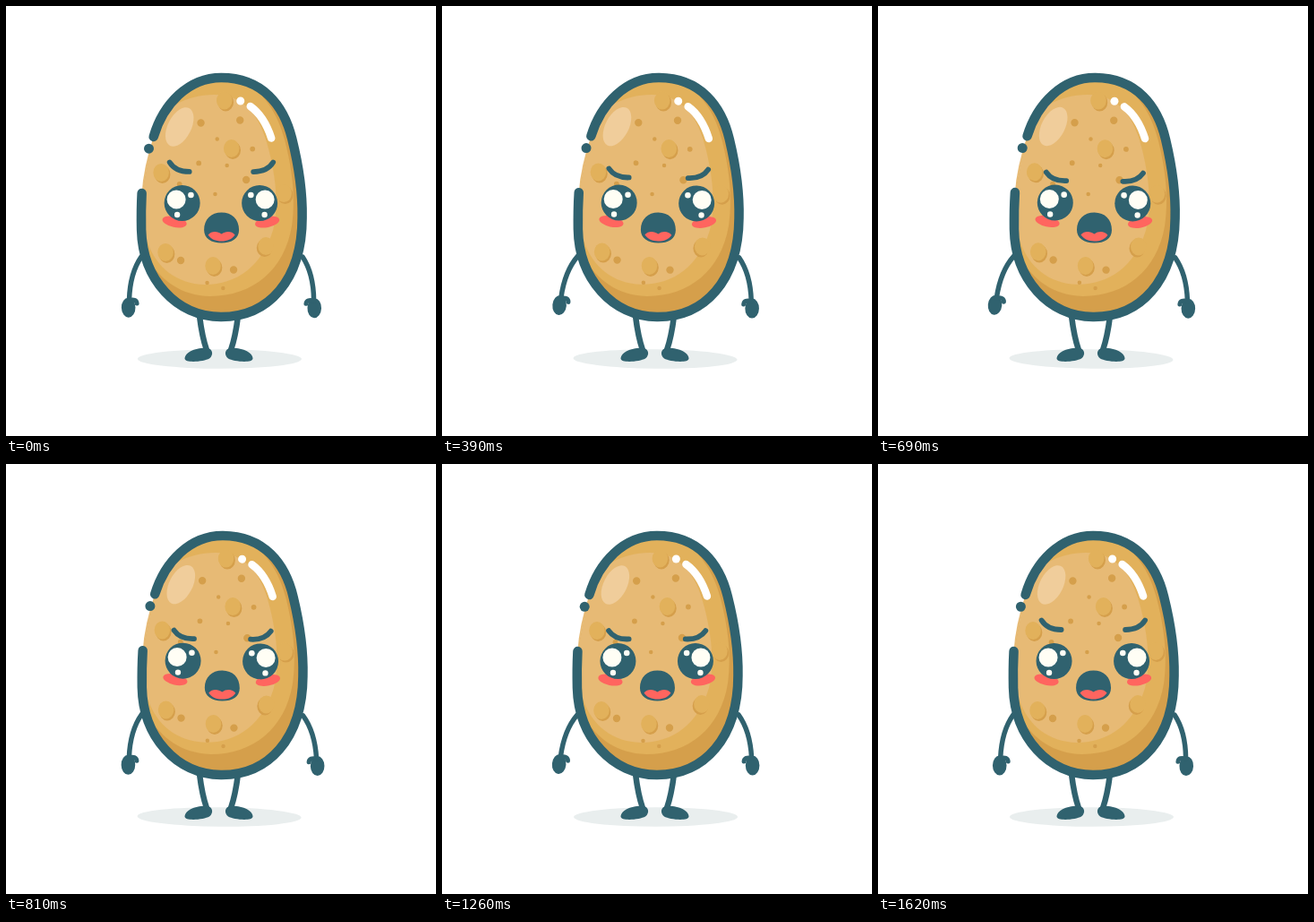
An HTML page for the animation above (1.65 s loop, 480x480 px).

```html
<!DOCTYPE html>
<html lang="en">
<head>
<meta charset="utf-8">
<title>Angry potato</title>
<style>
  html, body { margin: 0; width: 100%; height: 100%; overflow: hidden; background: #fff; }
  svg { display: block; width: 100vw; height: 100vh; }
  .line, .dots { fill: none; stroke: #30626f; stroke-linecap: round; }
  .dots { stroke: #d59f4b; }
  .ink { fill: #30626f; }
  .red { fill: #ff655f; }
  .white { fill: #fffef5; }
  .light { fill: #e7ba75; }
  .mid { fill: #e2b15b; }
  .dark { fill: #d59f4b; }
</style>
</head>
<body>
<svg viewBox="0 0 480 480">
  <defs>
    <path id="skin" d="M164.500 146C175 110 203 80 240 80C286 80 310 111 319 148C326.500 178 331 205 330.500 236C330.500 306 293 347 240 347C190 347 152.500 305 151 250Q150.500 228 151.500 209"/>
    <clipPath id="inside"><use href="#skin"/></clipPath>
    <g id="leg">
      <path class="line" stroke-width="6.500" d="M216 346Q219 370 224 384"/>
      <path class="ink" d="M199.500 393.500C200 385.500 213 381.500 224 381.500C231 382.500 232 389.500 227 393.500C221 397 199.500 399 199.500 393.500Z"/>
    </g>
    <g id="arm">
      <path class="line" stroke-width="5.500" d="M151 280Q138 298 136.500 328"/>
      <ellipse class="ink" cx="135.500" cy="336.500" rx="7.800" ry="11"/>
      <path class="line" stroke-width="5" d="M136 328.500Q144.500 326.500 145 332"/>
    </g>
    <g id="bump">
      <ellipse class="dark" cx="1.500" cy="2" rx="8.800" ry="10"/>
      <ellipse class="mid" rx="8.800" ry="10"/>
    </g>
    <g id="eye">
      <circle class="ink" cx="196.500" cy="220" r="20"/>
      <circle class="white" cx="206.300" cy="211" r="3.300"/>
      <circle class="white" cx="191" cy="233" r="3.200"/>
    </g>
    <ellipse id="blush" class="red" cx="188" cy="241" rx="13.800" ry="6" transform="rotate(12 188 241)"/>
    <path id="brow" class="line" stroke-width="5.800" d="M182.500 174.500Q189 185 204.500 185"/>
  </defs>

  <g class="sway">
    <ellipse cx="238.500" cy="394" rx="91.500" ry="10.800" fill="#e9eeee"/>
  </g>
  <use href="#leg"/>
  <use href="#leg" transform="translate(475) scale(-1 1)"/>

  <g class="sway">
    <use href="#arm" id="armL"/>
    <g transform="translate(482) scale(-1 1)"><use href="#arm" id="armR"/></g>

    <path class="light" d="M151.500 209Q153 181 164.500 146Z"/>
    <use href="#skin" class="dark"/>
    <g clip-path="url(#inside)">
      <path class="mid" d="M140 70H235C280 84 301 112 311 150C320 185 323 215 319 245C311 295 275 324 228 324C195 323 174 307 158 282L130 260Z"/>
      <path class="light" d="M140 150C170 118 198 99 232 99C266 99 284 123 293 160C302 195 304 225 298 250C286 290 258 311 222 311C190 310 168 292 158 264L130 240Z"/>
      <ellipse cx="193.500" cy="135" rx="13" ry="23.500" fill="#f0cd9b" transform="rotate(27 193.500 135)"/>
      <path class="dots" stroke-width="4.500" d="M235.500 148.500h0M246.500 178h0M233.300 210h0M224.500 309h0M242.300 315h0"/>
      <path class="dots" stroke-width="5.800" d="M275 159.500h0M215 175.500h0M193.500 199h0"/>
      <path class="dots" stroke-width="8.400" d="M217.300 130.500h0M261 127.500h0M268 194h0M195 284h0M254 294.500h0"/>
      <use href="#bump" x="251.500" y="159"/>
      <use href="#bump" x="243.500" y="105.500"/>
      <use href="#bump" x="173" y="186"/>
      <use href="#bump" x="178" y="275"/>
      <use href="#bump" x="231" y="290"/>
      <use href="#bump" x="310" y="209"/>
      <use href="#bump" transform="translate(290 268) scale(-1 1)"/>
    </g>
    <use href="#skin" class="line" stroke-width="10.500"/>
    <circle class="ink" cx="159.300" cy="159.300" r="5.500"/>

    <circle cx="261.500" cy="106" r="4.500" fill="#fff"/>
    <path class="line" style="stroke: #fff" stroke-width="8.500" d="M272.500 112Q288 123 296 147.500"/>

    <g id="half">
      <use href="#blush"/>
      <use href="#eye"/>
    </g>
    <use href="#half" transform="translate(479.500) scale(-1 1)"/>
    <circle class="white" cx="190" cy="216" r="10.500"/>
    <circle class="white" cx="289" cy="216" r="10.500"/>

    <path class="ink" d="M221 250C221 238 229 230.500 240.500 230.500S260 238 260 250C260 259.500 252 264.500 240.500 264.500S221 259.500 221 250Z"/>
    <path class="red" d="M225.500 255.500C229 251 236 251 240.500 254.500C245 251 252 251 255.500 255.500C252 260.500 247 262.500 240.500 262.500S229 260.500 225.500 255.500Z"/>

    <use href="#brow" id="browL"/>
    <g transform="translate(480.500) scale(-1 1)"><use href="#brow" id="browR"/></g>
  </g>
</svg>
<script>
  const LOOP = 1650, STEP = 30;

  const smooth = (a, b, t) => {
    const u = Math.min(1, Math.max(0, (t - a) / (b - a)));
    return u * u * (3 - 2 * u);
  };
  // Cosine that runs a whole number of cycles per loop
  const wave = (t, cycles, peak) => Math.cos(2 * Math.PI * cycles * (t - peak) / LOOP);
  const move = (selector, value) => document.querySelectorAll(selector)
    .forEach(node => node.setAttribute('transform', value));

  function draw(now) {
    const t = Math.floor(now % LOOP / STEP) * STEP;
    move('.sway', `rotate(${.27 + .35 * wave(t, 1, 580)} 240 345)`);
    move('#armL', `rotate(${2 - 3.2 * wave(t, 6, 5)} 151 280)`);
    move('#armR', `rotate(${1.7 * wave(t, 3, 260) - .6} 151 280)`);
    const frown = smooth(300, 450, t) - smooth(1350, 1530, t);
    move('#browL, #browR', `translate(${4 * frown} ${11 * frown}) rotate(${-3 * frown} 194 181)`);
  }

  const start = performance.now();
  function tick() {
    draw(performance.now() - start);
    requestAnimationFrame(tick);
  }
  tick();
</script>
</body>
</html>
```
